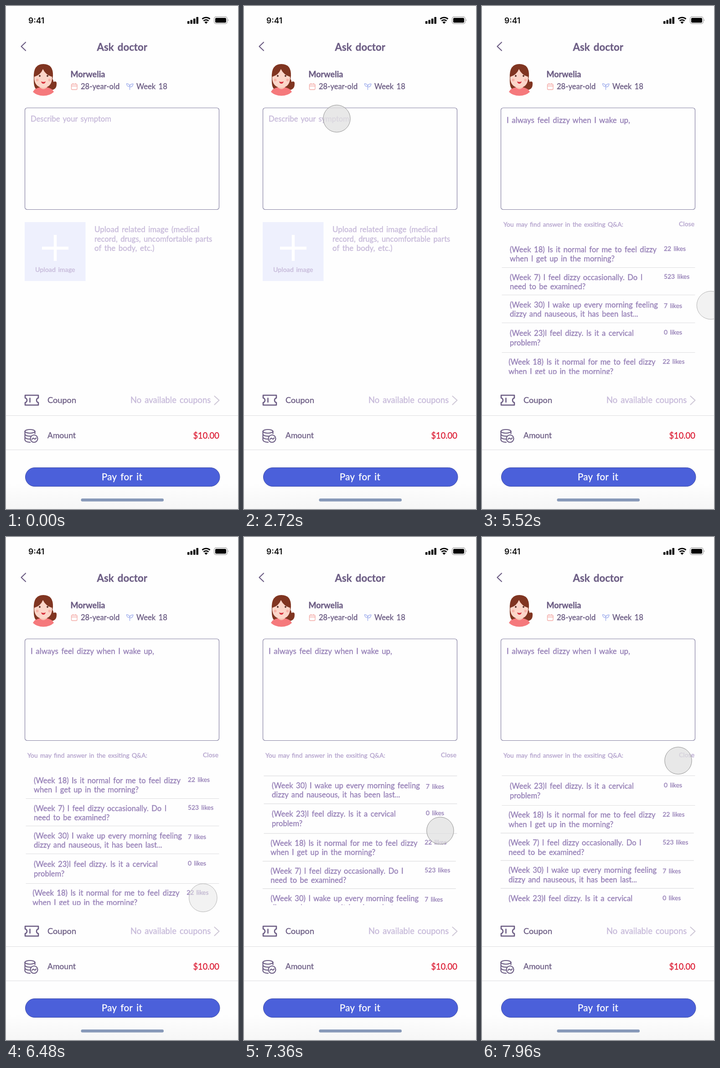
These frames come from a looping animation (509 px wide and 1101 px high, 8 s). An HTML page:

```html
<!DOCTYPE html>
<html lang="en">
<head>
<meta charset="utf-8">
<title>Ask doctor</title>
<style>
  html, body { margin: 0; width: 100%; height: 100%; overflow: hidden; background: #fefefe; }
  svg { display: block; width: 100vw; height: 100vh; }
  text {
    font-family: Lato, "Open Sans", sans-serif;
    font-size: 16.6px;
    word-spacing: .13em;
    stroke-width: .35px;
    white-space: pre;
  }
  .dark { fill: #6c5d84; stroke: #6c5d84; }
  .mid { fill: #957fb6; stroke: #957fb6; }
  .soft { fill: #b3a2cc; stroke: #b3a2cc; }
  .pale { fill: #c6b9d9; stroke: #c6b9d9; }
  .red { fill: #dc1f36; stroke: #dc1f36; }
  .white { fill: #fff; stroke: #fff; }
  .bold { font-weight: 700; }
  .line { fill: none; stroke-linecap: round; stroke-linejoin: round; }
  .rule { stroke: #dedee0; stroke-width: 1.2; }
</style>
</head>
<body>
<svg viewBox="0 0 509 1101" preserveAspectRatio="none">
  <defs>
    <linearGradient id="shade" x2="0" y2="1">
      <stop offset="0" stop-color="#fefefe"/>
      <stop offset="1" stop-color="#f6f6f6"/>
    </linearGradient>
    <clipPath id="window"><rect x="40" y="514.5" width="430" height="291"/></clipPath>
  </defs>
  <rect width="509" height="1101" fill="#fefefe"/>
  <rect y="1045" width="509" height="56" fill="url(#shade)"/>

  <g id="status">
    <text x="49" y="37.5" style="font:600 17.5px Inter,sans-serif" fill="#111">9:41</text>
    <g fill="#050505">
      <rect x="398" y="33" width="4.5" height="6" rx="1"/>
      <rect x="404.5" y="30.5" width="4.5" height="8.5" rx="1"/>
      <rect x="411" y="27.5" width="4.5" height="11.5" rx="1"/>
      <rect x="417.5" y="24" width="4.5" height="15" rx="1"/>
      <path d="M439 39l-3.5-3.6a5 5 0 0 1 7 0z"/>
      <rect x="459" y="26" width="24" height="10.5" rx="2.2"/>
      <path d="M487 28.500q2.500 2.500 0 5z" fill="#999"/>
    </g>
    <path class="line" d="M430.500 28.500a12.500 12.500 0 0 1 17 0M433.500 32.500a8 8 0 0 1 11 0" stroke="#050505" stroke-width="2.800" style="stroke-linecap:butt"/>
    <rect x="456.700" y="23.700" width="28.600" height="15" rx="4" fill="none" stroke="#999" stroke-width="1.200"/>
  </g>

  <path class="line" d="M43 79.500L33.500 88.500L43 97.500" stroke="#6c5d84" stroke-width="2.200"/>
  <text class="dark bold" x="199.500" y="98" style="font-size:22.200px">Ask doctor</text>

  <g id="avatar">
    <path d="M98 159Q104 158 104 166Q112 163 111 171Q111 184 97 184Q93 176 98 159z" fill="#803521"/>
    <path d="M61 158Q59 127 82 127Q104 127 103 153L98 183H68Q60 180 61 158z" fill="#803521"/>
    <path d="M74 170h16v10q-8 9-16 0z" fill="#f6bfae"/>
    <path d="M62 155Q76 151 81 138Q87 151 101 155V160Q99 178 82 179Q64 178 62 160z" fill="#fcd6c9"/>
    <path d="M59 188Q63 180 74 178Q82 186 90 178Q101 180 105 188Q96 196.500 82 196.500T59 188z" fill="#f5797c"/>
    <g fill="#542a22"><circle cx="74" cy="153" r="1.900"/><circle cx="91" cy="153" r="1.900"/></g>
    <g fill="#f9b5aa"><circle cx="68.500" cy="162" r="3"/><circle cx="95.500" cy="162" r="3"/></g>
    <path d="M77 165q5 2.500 10 0q-1 5-5 5t-5-5z" fill="#d8333f"/>
  </g>
  <text class="dark bold" x="141.500" y="156" style="font-size:18px">Morwelia</text>
  <g class="line" stroke="#f3aaa6" stroke-width="1.300">
    <rect x="143.500" y="171" width="12.500" height="12" rx="2"/>
    <path d="M144 175h12M147 169.500v2M152.500 169.500v2"/>
  </g>
  <text class="dark" x="164" y="182">28-year-old</text>
  <path class="line" d="M271.500 183V176Q265 177 264.500 170Q271 170 271.500 176Q272 170 279 170.500Q278 178 271.500 177" stroke="#a2b0ed" stroke-width="1.400"/>
  <text class="dark" x="286" y="182">Week 18</text>

  <rect x="41.500" y="223" width="426" height="222.500" rx="5" fill="none" stroke="#8682a3" stroke-width="1.200"/>

  <g id="empty">
    <text class="pale" x="54" y="252.500">Describe your symptom</text>
    <rect x="41" y="473" width="133.500" height="129" fill="#eef0fd"/>
    <path d="M108 501V558M79 530H137" stroke="#fff" stroke-width="6.500"/>
    <text class="pale" x="64" y="582" style="font-size:14.300px">Upload image</text>
    <g class="pale" style="font-size:17px">
      <text x="194" y="495" style="font-size:inherit">Upload related image (medical</text>
      <text x="194" y="515.500" style="font-size:16.700px">record, drugs, uncomfortable parts</text>
      <text x="194" y="536" style="font-size:inherit">of the body, etc.)</text>
    </g>
  </g>

  <g id="filled">
    <text class="mid" x="54" y="255.500" style="font-size:16.900px">I always feel dizzy when I wake up,</text>
    <text class="soft" x="47" y="483" style="font-size:13.800px">You may find answer in the exsiting Q&amp;A:</text>
    <text class="soft" x="432" y="482" style="font-size:14px">Close</text>
    <g clip-path="url(#window)"><g id="list"></g></g>
  </g>

  <g class="line" stroke="#6c5d84" stroke-width="2.600">
    <path d="M42 852H71V858Q67 859 67 863T71 868V873.500H42V868Q46 867 46 863T42 858zM52.500 858.500V867"/>
    <g stroke-width="2.200">
      <ellipse cx="52.500" cy="931" rx="11" ry="4"/>
      <path d="M41.500 931V950Q43 954.500 53 955M63.500 931V936M41.500 937.500Q44 942 54 941.500M41.500 944Q44 948 52 948"/>
      <circle cx="61.500" cy="947" r="8"/>
      <path d="M57 948.500q2.500-4 4.700-1.500t4.300-1.500"/>
    </g>
  </g>
  <text class="dark" x="91" y="869" style="font-size:18.200px">Coupon</text>
  <text class="pale" x="273" y="869" style="font-size:18.400px">No available coupons</text>
  <path class="line" d="M457.500 854L467.500 863L457.500 872.500" stroke="#d0cad8" stroke-width="2.200"/>
  <path class="rule" d="M0 896.500H509M0 971.500H509"/>
  <text class="dark" x="91" y="946" style="font-size:17.600px">Amount</text>
  <text class="red" x="410.500" y="946.500" style="font-size:18.300px">$10.00</text>

  <rect x="42.500" y="1010.500" width="426.500" height="41" rx="20.500" fill="#4b60da" stroke="#3f4da8"/>
  <text class="white" x="210" y="1037.500" style="font-size:20.400px;letter-spacing:.4px">Pay for it</text>
  <rect x="164.500" y="1078" width="181.500" height="6.500" rx="3.200" fill="#8799b8"/>

  <circle id="touch"/>
</svg>
<script>
const LOOP = 8000, STEP = 40;
const byId = id => document.getElementById(id);
const empty = byId('empty'), filled = byId('filled'), list = byId('list'), touch = byId('touch');

function add(name, attrs, content = '') {
  const node = document.createElementNS('http://www.w3.org/2000/svg', name);
  for (const key in attrs) node.setAttribute(key, attrs[key]);
  node.textContent = content;
  list.append(node);
}

const questions = [
  { y: 538.5, gap: 20.5, likesY: 536, rule: 572.5, likes: 22,
    lines: ['(Week 18) Is it normal for me to feel dizzy', 'when I get up in the morning?'] },
  { y: 599.5, gap: 20.5, likesY: 597, rule: 632.5, likes: 523,
    lines: ['(Week 7) I feel dizzy occasionally. Do I', 'need to be examined?'] },
  { y: 659.5, gap: 20.5, likesY: 660.5, rule: 693.5, likes: 7,
    lines: ['(Week 30) I wake up every morning feeling', 'dizzy and nauseous, it has been last...'] },
  { y: 721.5, gap: 21.5, likesY: 719, rule: 758.5, likes: 0,
    lines: ['(Week 23)I feel dizzy. Is it a cervical', 'problem?'] }
];

// The four questions appear twice, the second set slightly to the left.
for (const [dx, dy] of [[0, 0], [-2.7, 246.7]]) {
  for (const q of questions) {
    q.lines.forEach((line, i) =>
      add('text', { class: 'mid', x: 61 + dx, y: q.y + dy + i * q.gap }, line));
    add('text', { class: 'mid', x: 399 + dx, y: q.likesY + dy, style: 'font-size:13.9px' }, q.likes + ' likes');
    add('path', { class: 'rule', d: `M${43.5 + dx} ${q.rule + dy}h424` });
  }
}

// Smooth monotone curve through [time, value] points.
function curve(points) {
  const slope = i => (points[i + 1][1] - points[i][1]) / (points[i + 1][0] - points[i][0]);
  const last = points.length - 1;
  const tangent = points.map((_, i) => {
    if (i === 0) return slope(0);
    if (i === last) return 0;
    const a = slope(i - 1), b = slope(i);
    return a * b > 0 ? 2 * a * b / (a + b) : 0;
  });
  return t => {
    if (t <= points[0][0]) return points[0][1];
    if (t >= points[last][0]) return points[last][1];
    const i = points.findIndex(p => p[0] > t) - 1;
    const [t0, v0] = points[i], [t1, v1] = points[i + 1];
    const span = t1 - t0, u = (t - t0) / span, w = 1 - u;
    return v0 * (1 + 2 * u) * w * w + v1 * u * u * (3 - 2 * u)
      + span * u * w * (tangent[i] * w - tangent[i + 1] * u);
  };
}

const path = [
  [680, 546, 175], [1000, 458, 180], [1520, 285, 214.5], [1640, 251, 226.5], [2120, 203.5, 246.5],
  [4000, 203.5, 246.5], [4040, 206.5, 247], [4280, 300, 277], [4560, 365.5, 303.5],
  [4760, 365.5, 303.5], [5120, 422, 440], [5520, 502, 655], [5600, 510, 686],
  [5860, 517, 768], [6100, 493, 803.5], [6440, 434.5, 791], [6520, 431.5, 789],
  [7000, 431.5, 789], [7160, 431.5, 721], [7600, 429, 560], [7840, 430, 500], [7960, 430.5, 489.5]
];
const touchX = curve(path.map(p => [p[0], p[1]]));
const touchY = curve(path.map(p => [p[0], p[2]]));
const scroll = curve([[7000, 0], [7160, 67], [7600, 145], [7840, 167], [7960, 171]]);
const reveal = curve([[3000, 0], [3200, .6], [3400, 1]]);

function render(t) {
  const shown = reveal(t);
  empty.setAttribute('opacity', 1 - shown);
  filled.setAttribute('opacity', shown);
  list.setAttribute('transform', `translate(0 ${-scroll(t)})`);

  const pressed = (t >= 2720 && t < 3040) || t >= 6760;
  touch.setAttribute('visibility', t < 720 ? 'hidden' : 'visible');
  touch.setAttribute('cx', touchX(t));
  touch.setAttribute('cy', touchY(t));
  touch.setAttribute('r', pressed ? 29.7 : 30.8);
  touch.setAttribute('fill', pressed ? 'rgba(224,224,224,.75)' : 'rgba(232,232,232,.52)');
  touch.setAttribute('stroke', pressed ? '#929292' : '#b4b4b4');
}

const start = performance.now();
function tick() {
  const t = (performance.now() - start) % LOOP;
  render(Math.floor(t / STEP) * STEP);
  requestAnimationFrame(tick);
}
tick();
</script>
</body>
</html>
```
